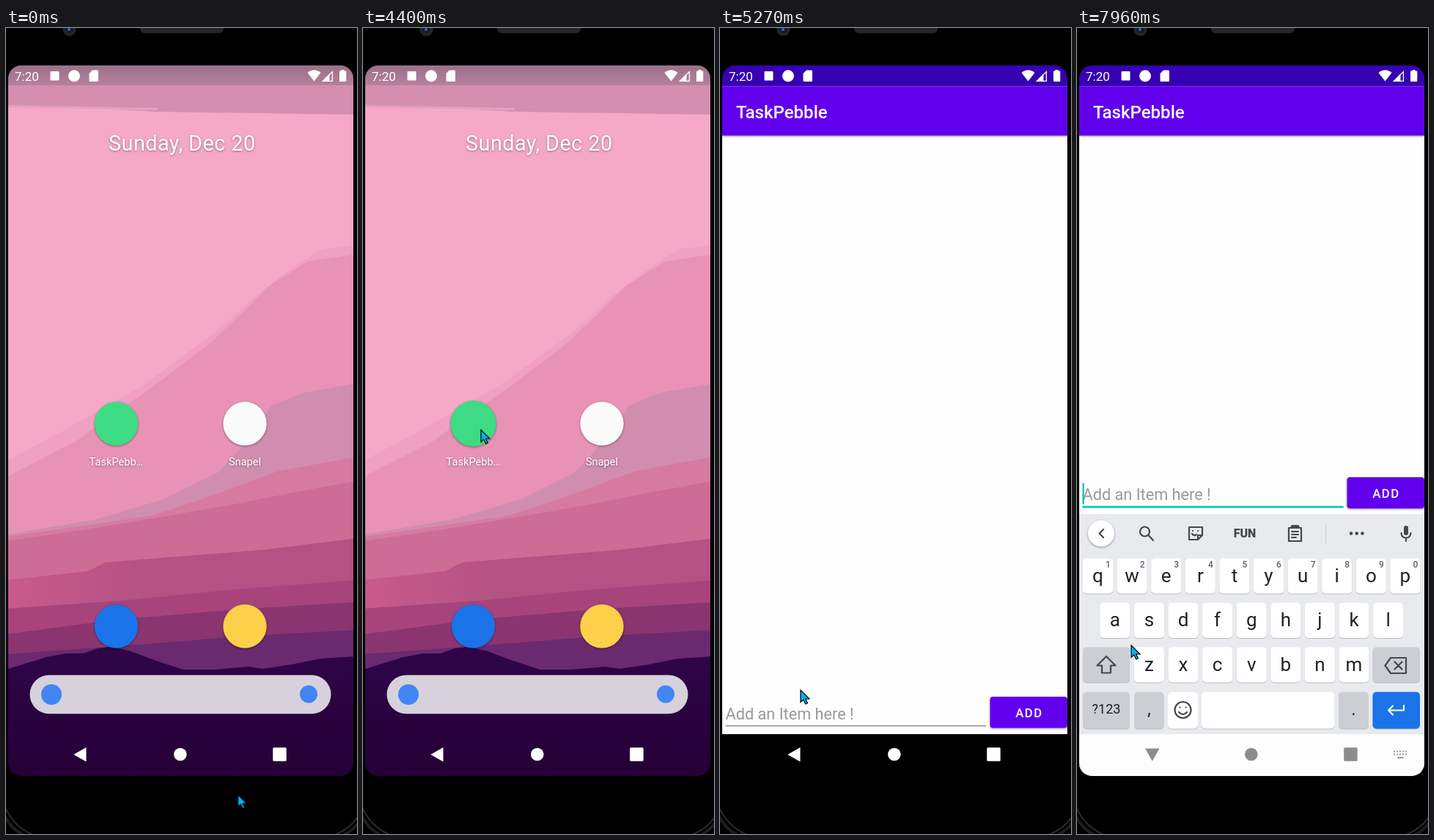
An HTML page that plays this animation: 479 px wide and 1098 px high, repeating every 8000 ms.

```html
<!DOCTYPE html>
<html lang="en">
<head>
<meta charset="utf-8">
<title>Task list demo</title>
<style>
html, body { margin: 0; width: 100%; height: 100%; overflow: hidden; background: #000; }
body { position: relative; font-family: Roboto, sans-serif; }
svg, .screen { position: absolute; left: 0; top: 0; width: 479px; height: 1098px; }
svg { overflow: visible; }
.screen { clip-path: inset(51px 5px 79px 3px round 18px); }
.mid { text-anchor: middle; }
.shade { filter: drop-shadow(0 1px 1.5px #0006); }
.line { fill: none; stroke: #44474b; stroke-width: 2.2; stroke-linecap: round; stroke-linejoin: round; }

/* Every part holds its pose until the next step of the 8 s loop. */
.anim { animation: 8s step-end infinite; }
.wallpaper { animation-name: wallpaper; }
.launcher { animation-name: launcher; }
.icon { animation-name: press; transform-origin: 150.5px 539px; }
.window { animation-name: open; transform-origin: 0 0; }
.content { animation-name: content; }
.row { animation-name: row; }
.focus { animation-name: focus; }
.caret { animation-name: caret; }
.keyboard { animation-name: keyboard; }
.nav { animation-name: nav; fill: #fff; }
.back { animation-name: back; transform-origin: 102px 989px; }
.switcher { animation-name: switcher; }
.cursor { animation-name: cursor; }

@keyframes wallpaper { 0% { transform: none } 56.875% { transform: translateY(-6px) } }
@keyframes launcher {
  0% { opacity: 1; transform: none }
  56.875% { opacity: .55; transform: translateY(-20px) }
  58.375% { opacity: .1; transform: translateY(-32px) }
  59.875% { opacity: 0 }
}
@keyframes press { 0% { transform: none } 55% { transform: scale(1.05) } }
@keyframes open {
  0% { opacity: 0 }
  56.875% { opacity: 1; transform: translate(41.3px, 159.6px) scale(.772); clip-path: inset(51px 5px 175px 3px round 45px) }
  58.375% { opacity: 1; transform: translate(12px, 47px) scale(.945); clip-path: inset(51px 5px 108px 3px round 24px) }
  59.875% { opacity: 1; transform: translate(2px, 7.2px) scale(.989); clip-path: inset(51px 5px 79px 3px) }
  61.375% { opacity: 1; transform: none; clip-path: inset(51px 5px 79px 3px) }
}
@keyframes content { 0% { opacity: 0 } 58.375% { opacity: .6 } 59.875% { opacity: 1 } }
@keyframes row { 0% { transform: none } 87.5% { transform: translateY(-299px) } }
@keyframes focus { 0% { opacity: 0 } 84.5% { opacity: 1 } }
@keyframes caret { 0% { opacity: 0 } 86% { opacity: 1 } 92% { opacity: 0 } 99.5% { opacity: 1 } }
@keyframes keyboard {
  0% { opacity: 0 }
  86% { opacity: 1; transform: translateY(240px) }
  87.5% { opacity: 1; transform: translateY(105px) }
  89% { opacity: 1; transform: translateY(25px) }
  90.5% { opacity: 1; transform: none }
}
@keyframes nav {
  0% { fill: #fff } 67.375% { fill: #f2f2f2 } 68.875% { fill: #e6e6e6 } 70.375% { fill: #d8d8d8 }
  72.25% { fill: #c8c8c8 } 73.75% { fill: #b8b8b8 } 75.25% { fill: #a8a8a8 } 78.25% { fill: #9a9a9a }
  86% { fill: #8c8c8c }
}
@keyframes back { 0% { transform: none } 87.5% { transform: rotate(-45deg) } 89% { transform: rotate(-90deg) } }
@keyframes switcher { 0% { opacity: 0 } 89% { opacity: 1 } }
@keyframes cursor {
  0% { transform: translate(316.5px, 1044.5px) }
  1.5% { transform: translate(327px, 1068px) }
  3% { transform: translate(327px, 1110px) }
  29.625% { transform: translate(302px, 1093px) }
  31.125% { transform: translate(284px, 1044px) }
  32.625% { transform: translate(274px, 1010px) }
  34.5% { transform: translate(269.5px, 997px) }
  39.125% { transform: translate(272px, 985px) }
  40.625% { transform: translate(277px, 963px) }
  42.125% { transform: translate(283px, 938px) }
  43.625% { transform: translate(287px, 918px) }
  45.5% { transform: translate(261px, 790px) }
  47% { transform: translate(209px, 640px) }
  48.5% { transform: translate(169.5px, 561px) }
  50.375% { transform: translate(172px, 558px) }
  51.875% { transform: translate(161px, 547.5px) }
  59.875% { transform: translate(161px, 549.5px) }
  61.375% { transform: translate(159px, 600px) }
  62.875% { transform: translate(146px, 725px) }
  64.375% { transform: translate(124px, 840px) }
  65.875% { transform: translate(110px, 902px) }
  67.375% { transform: translate(103px, 914px) }
  68.875% { transform: translate(97px, 924px) }
  70.375% { transform: translate(93.5px, 931px) }
  72.25% { transform: translate(90px, 936px) }
  73.75% { transform: translate(88px, 939px) }
  75.25% { transform: translate(87px, 939.5px) }
  92% { transform: translate(95px, 935px) }
  93.5% { transform: translate(106px, 926px) }
  95% { transform: translate(103px, 908px) }
  96.5% { transform: translate(94px, 884px) }
  98% { transform: translate(82px, 857px) }
  99.5% { transform: translate(74px, 841px) }
}
</style>
</head>
<body>

<!-- Phone body -->
<svg>
  <rect width="479" height="1098"/>
  <circle cx="86.500" cy="2" r="9" fill="#24252b"/>
  <circle cx="86.500" cy="2" r="5" fill="#101a30"/>
  <circle cx="86" cy="2" r="2" fill="#4668a0"/>
  <rect x="183" y="-10" width="114" height="17" rx="6" fill="#252525"/>
  <g fill="none" stroke="#2c2c2c" stroke-width="2">
    <path d="M-1 1062Q10 1087 36 1099M480 1075Q470 1090 449 1099"/>
    <path d="M-1 1075Q8 1091 23 1099M480 1084Q474 1092 462 1099" stroke="#1e1e1e" stroke-width="4"/>
  </g>
</svg>

<div class="screen">
  <svg class="wallpaper anim">
    <defs>
      <linearGradient id="night" x1="0" y1="0" x2="0" y2="1">
        <stop offset="0" stop-color="#2f0549"/><stop offset="1" stop-color="#240033"/>
      </linearGradient>
      <linearGradient id="rose" x1="0" y1="0" x2="1" y2="0">
        <stop offset="0" stop-color="#c95b8b"/><stop offset=".4" stop-color="#b35283"/>
      </linearGradient>
      <linearGradient id="scrim" x1="0" y1="0" x2="0" y2="1">
        <stop offset="0" stop-color="#49485a" stop-opacity=".42"/>
        <stop offset="1" stop-color="#49485a" stop-opacity=".2"/>
      </linearGradient>
    </defs>
    <rect y="40" width="479" height="1000" fill="#f5a9c7"/>
    <path fill="#d48eae" d="M0 40H479V118L205 114L120 109L0 106Z"/>
    <path fill="#e0a3be" d="M0 105L207 109V112L0 108Z"/>
    <path fill="#f0a0c1" d="M0 590L70 553L185 488L290 412L340 365L400 320L432 301L479 296V900H0Z"/>
    <path fill="#e893b5" d="M0 612L95 563L215 478L280 428L318 392L358 352L412 318L479 308V900H0Z"/>
    <path fill="#d18dad" d="M479 484L405 497L362 515L340 550L290 605L215 642L120 670L0 690V900H479Z"/>
    <path fill="#d67b9f" d="M479 584L370 604L270 641L200 664L120 676L0 693V900H479Z"/>
    <path fill="#cd6c94" d="M479 617L390 633L300 651L200 668L110 683L0 699V900H479Z"/>
    <path fill="url(#rose)" d="M479 695L350 711L210 722L135 728L112 740L0 752V900H479Z"/>
    <path fill="#a7447b" d="M479 752L300 766L160 780L0 791V900H479Z"/>
    <path fill="#8a3570" d="M479 782L330 791L150 806L0 826V900H479Z"/>
    <path fill="#6a2a70" d="M479 820L330 828L180 840L0 853V900H479Z"/>
    <path fill="url(#night)" d="M0 874L55 857L82 852L106 852L125 845L145 843L170 849L205 862L241 874L285 874L331 870L350 873L390 867L430 859L479 856V1040H0Z"/>
  </svg>

  <svg class="launcher anim">
    <rect y="51" width="479" height="27" fill="url(#scrim)"/>
    <g fill="#fff" class="mid shade">
      <text x="240.300" y="167" font-size="28.800" letter-spacing=".45">Sunday, Dec 20</text>
      <text x="150.500" y="596" font-size="14.600">TaskPebb…</text>
      <text x="326" y="596" font-size="14.600">Snapel</text>
    </g>
    <g class="shade">
      <circle class="icon anim" cx="150.500" cy="539" r="29.700" fill="#3ddc84"/>
      <circle cx="326" cy="539" r="29.700" fill="#fafafa"/>
      <circle cx="150.500" cy="815" r="29.700" fill="#1a73e8"/>
      <circle cx="326" cy="815" r="29.700" fill="#fdd04a"/>
    </g>
    <rect x="32.500" y="881.500" width="411" height="52.700" rx="26.300" fill="#d6d1da"/>
    <circle cx="62" cy="908" r="14" fill="#4285f4"/>
    <circle cx="413" cy="907.500" r="12" fill="#4285f4"/>
  </svg>

  <svg class="window anim">
    <rect x="3" y="51" width="471" height="968"/>
    <rect x="3" y="51" width="471" height="911" fill="#fefefe"/>
    <rect x="3" y="51" width="471" height="28.500" fill="#3700b3"/>
    <g class="content anim">
      <rect x="3" y="79.500" width="471" height="67" fill="#6200ee" class="shade"/>
      <text x="22" y="122.500" font-size="24" font-weight="500" fill="#fff">TaskPebble</text>
      <g class="row anim">
        <text x="7.500" y="942" font-size="21.700" fill="#999">Add an Item here !</text>
        <rect x="7.500" y="950" width="356" height="1.300" fill="#858585"/>
        <rect class="focus anim" x="7.500" y="950.500" width="356" height="2.400" fill="#03dac5"/>
        <rect class="caret anim" x="7.500" y="919" width="2.200" height="29" fill="#03bfae"/>
        <rect x="368.500" y="911" width="105.500" height="42.500" rx="4" fill="#6200ee" class="shade"/>
        <text x="422" y="938.500" class="mid" font-size="16.800" font-weight="500" letter-spacing="1.500" fill="#fff">ADD</text>
      </g>
    </g>
  </svg>

  <svg class="keyboard anim">
    <rect x="3" y="662" width="471" height="300" fill="#e8eaed"/>
    <rect x="3" y="962" width="471" height="400" fill="#fdfdfd"/>
    <circle cx="33" cy="688.500" r="18" fill="#fff" class="shade"/>
    <g class="line">
      <path d="M36 683L30.500 688.500L36 694"/>
      <path d="M97.500 691L104 698"/><circle cx="92.500" cy="686" r="6.500"/>
      <path d="M153 680H171V691L165 697H153ZM165 697V691H171M157 689Q160 693 163 690M158 685H158.100M165 685H165.100"/>
      <path d="M289 681H306V699H289ZM293 686H302M293 690H302M293 694H299"/>
      <path d="M294 679.500H301" stroke-width="5"/>
      <path d="M442.500 688Q443 694.500 449 694.500T455.500 688M449 695V699"/>
      <path d="M449 681V688" stroke-width="6"/>
      <path d="M374 688.500H374.100M381.700 688.500H381.800M389.400 688.500H389.500" stroke-width="4.500"/>
    </g>
    <rect x="339" y="675" width="1.200" height="27" fill="#cfd1d5"/>
    <text x="229" y="694" class="mid" font-size="16" font-weight="800" fill="#44474b">FUN</text>
    <g id="keys"></g>
    <g class="line">
      <path d="M40 856L27.500 868.500H34V878.500H46V868.500H52.500Z"/>
      <path d="M428 858H449V879H428L420.500 868.500ZM433.500 863.500L443.500 873.500M443.500 863.500L433.500 873.500"/>
      <circle cx="144.500" cy="929" r="11"/>
      <path d="M139 932Q144.500 938 150 932M140.500 925.500H140.600M148.500 925.500H148.600"/>
      <path d="M446 923V929.500H425M431 923.500L425 929.500L431 935.500" stroke="#fff"/>
    </g>
  </svg>

  <svg fill="#fff">
    <text x="12" y="71.700" font-size="17">7:20</text>
    <rect x="60.500" y="59" width="12" height="12.500" rx="1"/>
    <circle cx="93" cy="65.300" r="8"/>
    <path d="M118 57.500H124.500Q126 57.500 126 59V71.500Q126 73 124.500 73H115Q113.500 73 113.500 71.500V62Z"/>
    <path d="M411.500 61Q420.500 53.500 429.500 61L420.500 72.500Z"/>
    <path d="M431 73L441.500 62.500V73Z"/>
    <path d="M432.500 72.400L445.400 59.500V72.400Z" fill="none" stroke="#fff" stroke-width="1.300"/>
    <path d="M457.500 57H461.500V58.500H463.500Q464.300 58.500 464.300 59.500V72Q464.300 73 463.300 73H456Q455 73 455 72V59.500Q455 58.500 456 58.500H457.500Z"/>
  </svg>

  <svg class="nav anim">
    <path class="back anim" d="M92.300 989.700L109.500 980V999.500Z"/>
    <circle cx="237.800" cy="989.500" r="8.800"/>
    <rect x="364.200" y="980.300" width="18.500" height="18.500" rx="1.500"/>
    <g class="switcher anim" fill="none" stroke="#999" stroke-width="2" stroke-dasharray="2 2">
      <path d="M432 985.500H451M432 989.500H451"/><path d="M437 994H446" stroke-dasharray="none"/>
    </g>
  </svg>
</div>

<svg>
  <path class="cursor anim" d="M0 0V16.500L3.800 13L6.800 19L9.400 17.800L6.700 12H12Z" fill="#00b4f5" stroke="#000" stroke-width="1.200"/>
</svg>

<script>
const PITCH = 46.6, LEFT = 8;
const keys = [];

function key(x, y, width, label = '', { fill = '#fff', size = 26, hint = '', height = 48 } = {}) {
  keys.push(`<rect x="${x}" y="${y + 1}" width="${width}" height="${height}" rx="5" fill="#b9bcc1"/>
    <rect x="${x}" y="${y}" width="${width}" height="${height}" rx="5" fill="${fill}"/>
    <text class="mid" x="${x + width / 2}" y="${y + 23.5 + size * .34}" font-size="${size}" fill="#202124">${label}</text>
    <text class="mid" x="${x + width - 6.5}" y="${y + 12.5}" font-size="12" font-weight="500" fill="#5f6368">${hint}</text>`);
}

function letters(text, column, y, hints = '') {
  [...text].forEach((c, i) => key(LEFT + (column + i) * PITCH, y, 41, c, { hint: hints[i] || '' }));
}

const grey = '#cbced3';
letters('qwertyuiop', 0, 722.5, '1234567890');
letters('asdfghjkl', .5, 783);
letters('zxcvbnm', 1.5, 843.5);
key(8, 843.5, 64, '', { fill: grey });
key(403.5, 843.5, 64.5, '', { fill: grey });
key(8, 904.5, 64, '?123', { fill: grey, size: 18, height: 50 });
key(78, 904.5, 40.5, ',', { fill: grey, size: 24, height: 50 });
key(124, 904.5, 41, '', { height: 50 });
key(170, 904.5, 181.5, '', { height: 50 });
key(357, 904.5, 41, '.', { fill: grey, size: 24, height: 50 });
key(403.5, 904.5, 64.5, '', { fill: '#1a73e8', height: 50 });
document.getElementById('keys').innerHTML = keys.join('');
</script>
</body>
</html>
```
